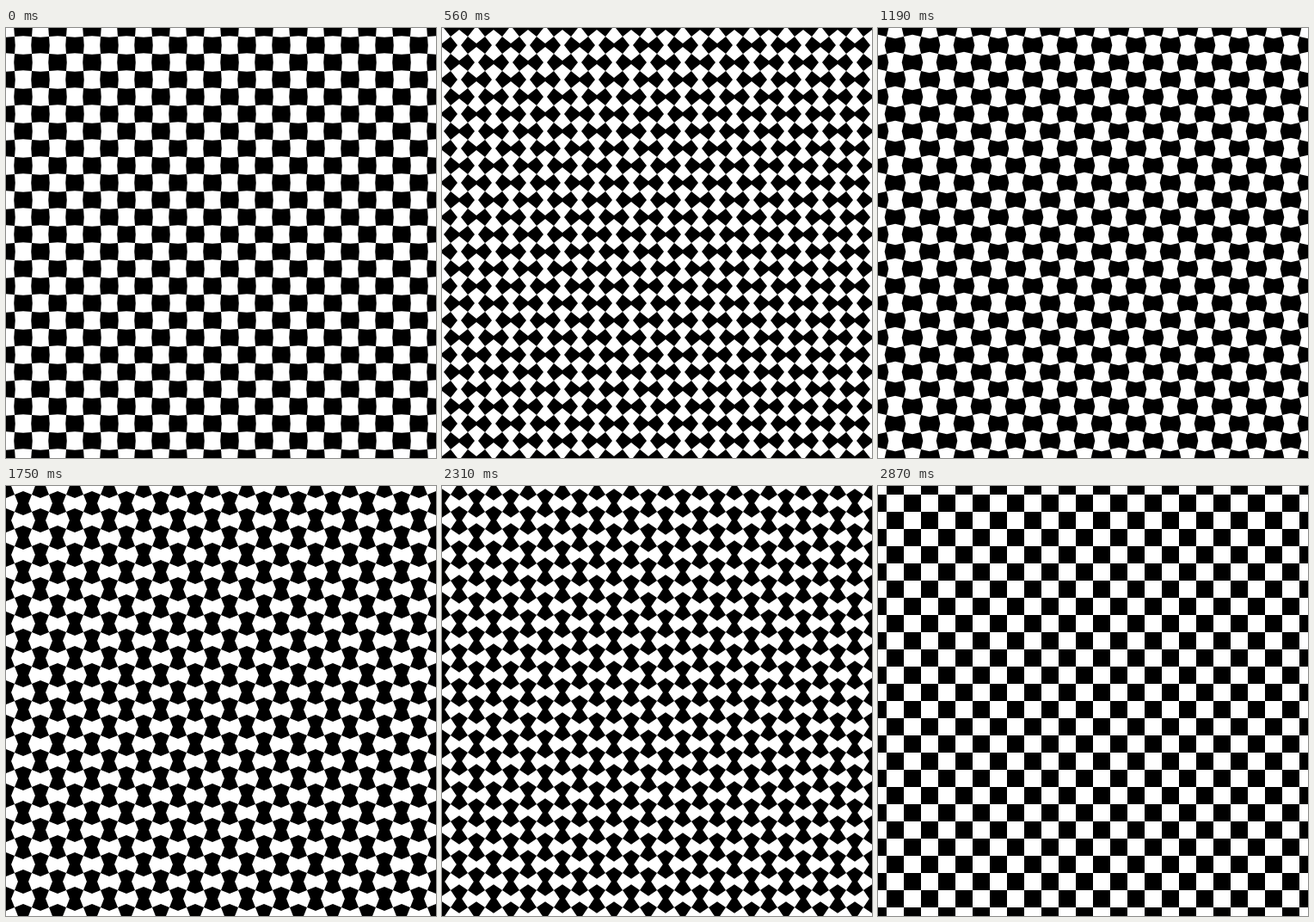
Recreate the animation shown at these times as an HTML page with a canvas. Size 500x500 px, loop 2940 ms.

```html
<!DOCTYPE html>
<html lang="en">
<head>
<meta charset="utf-8">
<title>Turning checkerboard</title>
<style>
  html, body { margin: 0; width: 100%; height: 100%; overflow: hidden; background: #fff; }
  canvas { display: block; width: 100vw; height: 100vh; }
</style>
</head>
<body>
<canvas id="stage" width="500" height="500"></canvas>
<script>
const STEP_MS = 70, STEPS = 42, TILE = 20;
const stage = document.getElementById('stage').getContext('2d');
const cell = document.createElement('canvas');
cell.width = cell.height = 2 * TILE;
const pen = cell.getContext('2d');

// A square window onto two opposite black quadrants, turned about its centre.
function drawTile(col, row, angle) {
  const half = TILE / 2;
  pen.save();
  pen.translate(col * TILE + half, row * TILE + half);
  pen.beginPath();
  pen.rect(-half, -half, TILE, TILE);
  pen.clip();
  if ((col + row) % 2) pen.scale(-1, 1);
  pen.rotate(-angle);
  pen.fillRect(0, -TILE, TILE, TILE);
  pen.fillRect(-TILE, 0, TILE, TILE);
  pen.restore();
}

function draw(angle) {
  pen.fillStyle = '#fff';
  pen.fillRect(0, 0, 2 * TILE, 2 * TILE);
  pen.fillStyle = '#000';
  for (let row = 0; row < 2; row++)
    for (let col = 0; col < 2; col++) drawTile(col, row, angle);
  stage.fillStyle = stage.createPattern(cell, 'repeat');
  stage.fillRect(0, 0, 500, 500);
}

// Neighbouring tiles turn in opposite directions, half a turn per loop.
function tick() {
  const step = Math.floor(performance.now() / STEP_MS) % STEPS;
  draw((step + 1) / STEPS * Math.PI);
  requestAnimationFrame(tick);
}
tick();
</script>
</body>
</html>
```
